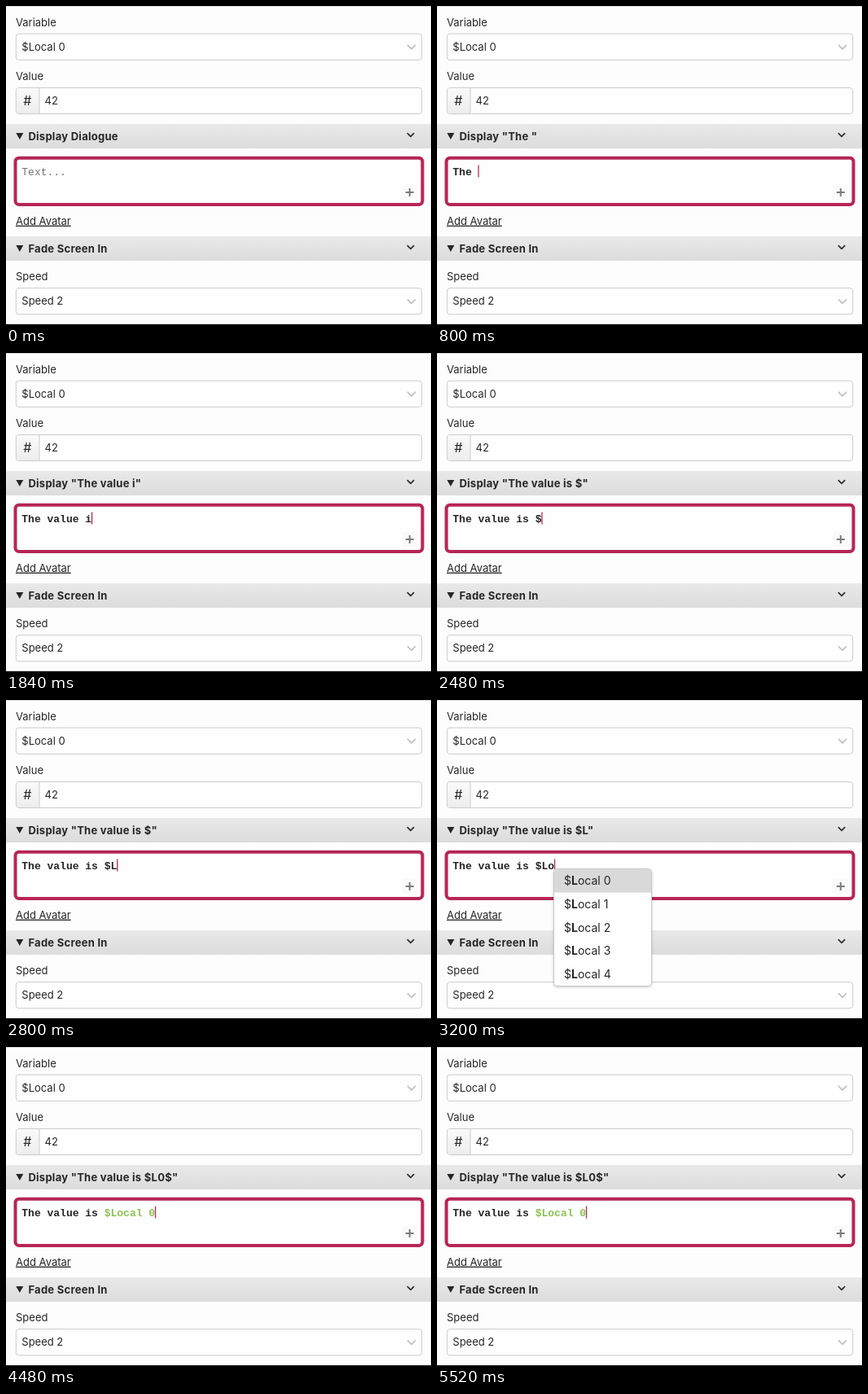
These frames come from a looping animation (522 px wide and 392 px high, 5.68 s). An HTML page:

```html
<!DOCTYPE html>
<html lang="en">
<head>
<meta charset="utf-8">
<title>Dialogue editor</title>
<style>
html, body { margin: 0; width: 100%; height: 100%; overflow: hidden; background: #fdfdfd; }
svg { display: block; width: 522px; height: 392px; }
text { font: 13px Inter, "Open Sans", sans-serif; fill: #262626; white-space: pre; }
.title { font-weight: 700; letter-spacing: .27px; }
.mono { font: 700 13px "Liberation Mono", monospace; }
.hint { font-weight: 400; fill: #747474; }
.item { font-size: 14px; }
.item .hit { font-weight: 700; }
.field { fill: #fefefe; stroke: #cbcbcb; }
.link { text-decoration: underline; }
.arrow { fill: none; stroke-width: 1.8; stroke-linecap: round; stroke-linejoin: round; }
</style>
</head>
<body>
<svg id="stage" viewBox="0 0 522 392" xmlns="http://www.w3.org/2000/svg">
  <defs>
    <linearGradient id="band" x2="0" y2="1">
      <stop stop-color="#e9e9e9"/><stop offset="1" stop-color="#dcdcdc"/>
    </linearGradient>
    <linearGradient id="cell" x2="0" y2="1">
      <stop stop-color="#fafafa"/><stop offset="1" stop-color="#ededed"/>
    </linearGradient>
    <filter id="shadow" x="-10%" y="-10%" width="120%" height="120%">
      <feDropShadow dx="0" dy="1" stdDeviation="1.5" flood-opacity=".2"/>
    </filter>
  </defs>
  <rect width="522" height="392" fill="#fdfdfd"/>
  <rect width="522" height="1" fill="#dcdcdc"/>
  <g id="form"></g>
  <rect x="11.5" y="186.7" width="500" height="57.3" rx="4.5" fill="#fefefe" stroke="#b72557" stroke-width="4"/>
  <rect x="486" y="219.5" width="19" height="19" rx="3" fill="#fafafa"/>
  <path d="M490.8 229h10M495.8 224v10" stroke="#7c7c7c" stroke-width="2"/>
  <text class="mono hint" id="hint" x="19.3" y="207.5">Text...</text>
  <text class="mono" x="19.3" y="207.5"><tspan id="typed"></tspan><tspan id="token" fill="#8cc152"></tspan></text>
  <rect id="caret" y="195.5" width="1.3" height="15" fill="#b02c58"/>
  <g id="menu">
    <rect x="143.5" y="207.5" width="120" height="144" rx="4" fill="#fefefe" stroke="#c9c9c9" filter="url(#shadow)"/>
    <rect id="mark" x="144" width="119" height="28.6" fill="#d9d9d9"/>
    <g id="items"></g>
  </g>
  <rect y="391" width="522" height="1" fill="#151515"/>
</svg>
<script>
const LOOP = 5680, CHAR = 7.8, LEFT = 19.3, ROW = 28.55;
const $ = id => document.getElementById(id);

function add(parent, tag, attrs, text = "") {
  const el = document.createElementNS("http://www.w3.org/2000/svg", tag);
  for (const key in attrs) el.setAttribute(key, attrs[key]);
  el.textContent = text;
  return parent.appendChild(el);
}

const form = $("form");
const label = (x, y, text, cls = "") => add(form, "text", { x, y, class: cls }, text);
const field = (y, h) => add(form, "rect", { class: "field", x: 12.3, y, width: 498.4, height: h, rx: 3.5 });
const chevron = (x, y, stroke, size) =>
  add(form, "path", { class: "arrow", stroke, d: `M${x - size} ${y}l${size} ${size}l${size} ${-size}` });

function select(y, name, value) {
  label(12, y - 9.3, name);
  field(y + .1, 32.2);
  label(LEFT, y + 20.7, value);
  chevron(498, y + 14.3, "#c2c2c2", 4.5);
}

function section(y, name) {
  add(form, "rect", { y, width: 522, height: 30, fill: "url(#band)" });
  add(form, "path", { d: `M12.3 ${y + 11}h9l-4.5 8z`, fill: "#262626" });
  chevron(497, y + 11.7, "#303030", 3.7);
  return label(27.4, y + 20, name, "title");
}

select(34, "Variable", "$Local 0");
label(12, 91.4, "Value");
field(100.5, 32);
add(form, "path", { d: "M41 101v31H16q-3 0-3-3v-25q0-3 3-3z", fill: "url(#cell)" });
add(form, "path", { d: "M41 101v31", stroke: "#cbcbcb" });
label(21.2, 122, "#").style.fontSize = "16px";
label(47.5, 121.4, "42");
const title = section(145, "");
label(12, 268.7, "Add Avatar", "link");
section(283, "Fade Screen In");
select(346.6, "Speed", "Speed 2");

const rows = [0, 1, 2, 3, 4].map(n => {
  const row = add($("items"), "text", { class: "item", x: 156, y: 227.4 + n * ROW });
  add(row, "tspan", {}, "$");
  const hit = add(row, "tspan", { class: "hit" });
  return { hit, rest: add(row, "tspan", {}), word: "Local " + n };
});

// Key presses: [time, delay before the heading follows]
const PHRASE = "The value is $Lo";
const KEYS = [
  [480, 80], [560, 80], [640, 80], [720, 80], [960, 0],
  [1120, 80], [1280, 80], [1360, 80], [1520, 0], [1680, 0],
  [1840, 0], [2000, 0], [2080, 0], [2480, 0], [2800, 80], [3200, 80]
];
const PICK = 4400;
const MOVES = [[0, 0], [3440, 1], [3520, 2], [3760, 1], [3920, 0]];

function draw(t) {
  const picked = t >= PICK;
  const count = KEYS.filter(k => t >= k[0]).length;
  const shown = KEYS.filter(k => t >= k[0] + k[1]).length;
  const token = picked ? "$Local 0" : "";
  const typed = picked ? "The value is " : PHRASE.slice(0, count);
  const heading = t >= PICK + 80 ? "The value is $L0$" : PHRASE.slice(0, shown);

  title.textContent = heading ? `Display "${heading}"` : "Display Dialogue";
  $("hint").style.display = count ? "none" : "";
  $("typed").textContent = typed;
  $("token").textContent = token;

  // The caret blinks every half second after the latest key.
  const last = picked ? PICK : count ? KEYS[count - 1][0] : -500;
  const tick = Math.floor(t / 80) * 80;
  const lit = count > 0 && Math.floor((tick - last) / 500) % 2 === 0;
  $("caret").style.display = lit ? "" : "none";
  $("caret").setAttribute("x", LEFT + (typed + token).length * CHAR - .2);

  const open = t >= 2880 && !picked;
  $("menu").style.display = open ? "" : "none";
  if (!open) return;
  const row = MOVES.filter(m => t >= m[0]).pop()[1];
  $("mark").setAttribute("y", 208 + row * ROW);
  const len = shown - PHRASE.indexOf("L");
  for (const { hit, rest, word } of rows) {
    hit.textContent = word.slice(0, len);
    rest.textContent = word.slice(len);
  }
}

function frame() {
  draw(performance.now() % LOOP);
  requestAnimationFrame(frame);
}
frame();
</script>
</body>
</html>
```
